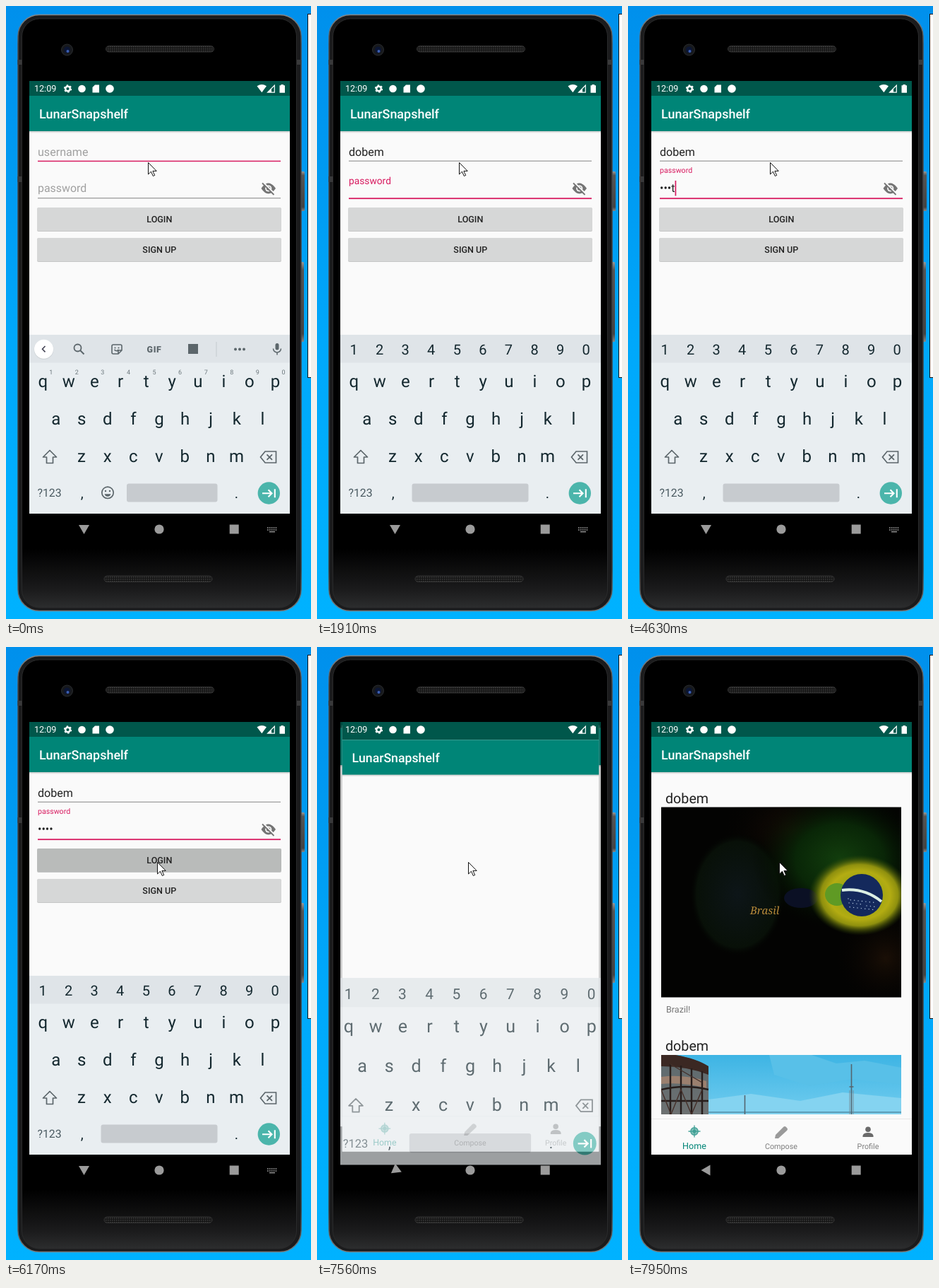
These frames come from a looping animation (432 px wide and 867 px high, 8000 ms). An HTML page:

```html
<!DOCTYPE html>
<html lang="en">
<head>
<meta charset="utf-8">
<title>Login demo</title>
<style>
html, body { margin: 0; width: 100%; height: 100%; overflow: hidden; background: #0ae; }
svg { display: block; width: 432px; height: 867px; font-family: Roboto, sans-serif; text-rendering: geometricPrecision; }
.mid { text-anchor: middle; }
.med { font-weight: 500; }
</style>
</head>
<body>
<script>
const LOOP = 8000, PINK = '#d81b60', USER = 'dobem';
const ICON = '#5c666b', KEY = '#14282f';

const rect = (x, y, w, h, fill, more = '') => `<rect x="${x}" y="${y}" width="${w}" height="${h}" fill="${fill}" ${more}/>`;
const disc = (x, y, r, fill, more = '') => `<circle cx="${x}" cy="${y}" r="${r}" fill="${fill}" ${more}/>`;
const oval = (x, y, rx, ry, fill) => `<ellipse cx="${x}" cy="${y}" rx="${rx}" ry="${ry}" fill="${fill}"/>`;
const path = (d, fill, more = '') => `<path d="${d}" fill="${fill}" ${more}/>`;
const line = (d, color, w = 1, more = '') => path(d, 'none', `stroke="${color}" stroke-width="${w}" ${more}`);
const text = (x, y, size, fill, str, cls = '', more = '') =>
  `<text x="${x}" y="${y}" font-size="${size}" fill="${fill}" class="${cls}" ${more}>${str}</text>`;
const group = (id, body, more = '') => `<g id="${id}" ${more}>${body}</g>`;
const row = (chars, x, y, size, fill) =>
  [...chars].map((c, i) => text(x + i * 36.58, y, size, fill, c, 'mid')).join('');
const ramp = (id, stops, kind = 'linear', more = 'x2="0" y2="1"') => `<${kind}Gradient id="${id}" ${more}>` +
  stops.map(([o, c, a = 1]) => `<stop offset="${o}" stop-color="${c}" stop-opacity="${a}"/>`).join('') + `</${kind}Gradient>`;
const clip = (id, x, y, w, h) => `<clipPath id="${id}">${rect(x, y, w, h, '#000')}</clipPath>`;

const defs = '<defs>' +
  ramp('sky', [[0, '#0090ec'], [.3, '#009bf2'], [.55, '#00a8fb'], [1, '#00b2ff']]) +
  ramp('metal', [[0, '#858789'], [.05, '#4a4b4d'], [.93, '#3a3b3c'], [1, '#77797b']]) +
  ramp('sheen', [[0, '#000'], [.9, '#000'], [.97, '#1b1b1c'], [1, '#2c2d2e']]) +
  ramp('side', [[0, '#999'], [.1, '#555'], [.9, '#444'], [1, '#888']]) +
  ramp('shade', [[0, '#000', .2], [1, '#000', 0]]) +
  ramp('day', [[0, '#3db4e4'], [1, '#72cdef']]) +
  ramp('green', [[0, '#123d0d'], [.5, '#092607'], [1, '#020601', 0]], 'radial', '') +
  ramp('rust', [[0, '#1a0f06'], [1, '#060302', 0]], 'radial', '') +
  ramp('dusk', [[0, '#0d1518'], [.85, '#081008'], [1, '#020201', 0]], 'radial', '') +
  ramp('gold', [[0, '#7f9a16'], [.6, '#b3ac12'], [.76, '#8f900e'], [1, '#2f4a08', 0]], 'radial', '') +
  clip('screen', 33, 106, 369, 656) + clip('button', 44, 285, 346, 33) +
  clip('frame', 47, 226.5, 340, 269) + clip('post', 47, 577, 340, 84) +
  '<pattern id="mesh" width="3" height="3" patternUnits="userSpaceOnUse"><rect width="3" height="3" fill="#161616"/><rect width="1.5" height="1.5" fill="#3d3d3d"/></pattern>' +
  '</defs>';

const grille = (x, y) => rect(x, y, 153, 8.5, 'url(#mesh)', 'rx="4.2" stroke="#343434"');
const phone =
  rect(0, 0, 432, 867, 'url(#sky)') +
  rect(427.5, 11.5, 8, 514, '#fff', 'stroke="#111"') +
  rect(417, 234, 6, 56, 'url(#side)', 'rx="1.5"') + rect(417, 362, 5, 113, 'url(#side)', 'rx="1.5"') +
  rect(17, 12.5, 401, 843, '#1b1b1c', 'rx="30" stroke="url(#metal)" stroke-width="1.5"') +
  rect(22.5, 18, 389, 833, 'url(#sheen)', 'rx="25" stroke="#2a2b2c"') +
  rect(16.5, 76, 6, 7, '#39393a') + rect(16.5, 241, 6, 8, '#39393a') + rect(412, 76, 6, 7, '#39393a') +
  grille(141.5, 56.5) + grille(139, 806) +
  disc(86.5, 62, 8, '#17191c', 'stroke="#2a2c2f"') + disc(86.5, 62, 4.5, '#0b1533') + disc(87.5, 64, 2, '#3c5fb4');

const bars = rect(33, 100, 369, 27, '#00574b') + rect(33, 127, 369, 50, '#008577') +
  rect(33, 177, 369, 3, 'url(#shade)') + text(47, 159.3, 17.96, '#fff', 'LunarSnapshelf', 'med');

const button = y => rect(44, y + .5, 346, 33.5, '#c6c7c7', 'rx="2"') + rect(44, y, 346, 33, '#d6d7d7', 'rx="2"');
const eye = path('M361.5 258Q371.5 243 382 258Q371.5 273 361.5 258Z', '#747474') + disc(371.7, 258, 4.6, '#fafafa') +
  disc(371.7, 258, 2.8, '#747474') + line('M364.5 249.5L381 266', '#fafafa', 2) + line('M363 250.5L379.5 267', '#747474', 1.8);

const login = rect(33, 106, 369, 560, '#fafafa') + bars +
  text(45, 212.3, 16.1, '#a0a0a0', 'username', '', 'id="hint"') +
  text(45, 212.3, 16.1, '#212121', '', '', 'id="user"') +
  rect(45, 214.2, 0, 1, '#212121', 'id="under"') + rect(45, 218.7, 344, 1.5, PINK, 'id="userLine"') +
  text(45, 263, 16, '#a0a0a0', 'password', '', 'id="label"') +
  text(45, 263.4, 16.1, '#212121', '', '', 'id="pass"') +
  rect(45, 271.3, 344, 1, '#808080', 'id="passLine"') + eye +
  rect(0, 0, 1.7, 21.5, PINK, 'id="caret"') +
  button(285) +
  group('ripple', disc(240, 301, 152, '#c6c8c7'), 'clip-path="url(#button)"') +
  rect(44, 285, 346, 33, '#b9bbba', 'rx="2" id="pressed"') + button(328) +
  text(217.3, 305.8, 12.57, '#222', 'LOGIN', 'mid med') + text(217.3, 349, 12.57, '#222', 'SIGN UP', 'mid med');

const dots = [325, 331, 337].map(x => disc(x, 485.5, 2, ICON)).join('');
const mic = rect(381.5, 477, 5, 9.5, ICON, 'rx="2.5"') + line('M378.5 484.5a5.5 5.5 0 0 0 11 0M384 490v3.5', ICON, 1.5);
const tools = line('M55.5 481l-4 4.2 4 4.2', '#445', 1.6) +
  disc(101.5, 483.5, 5, 'none', `stroke="${ICON}" stroke-width="1.8"`) + line('M105 487l5.5 5.5', ICON, 2) +
  line('M152 479h10q2 0 2 2v6l-5 5h-7q-2 0-2-2v-9q0-2 2-2zM164 487h-5v5M153.5 486q3 3.5 6 0', ICON, 1.6) +
  disc(154.5, 483.5, 1, ICON) + disc(159.5, 483.5, 1, ICON) +
  text(210, 489.8, 12.4, ICON, 'GIF', 'mid', 'font-weight="900" letter-spacing=".6"') +
  rect(258, 478, 14, 14, ICON) + rect(297.5, 475, 1, 21, '#c3c9cd') + dots;
const words = line('M51.5 481l4 4.2-4 4.2', '#445', 1.6) + rect(161.7, 475, 1, 21, '#c3c9cd') + rect(269.7, 475, 1, 21, '#c3c9cd') +
  [113.5, 215.5, 318].map((x, i) => text(x, 491.5, 16.4, '#6b767b', '', 'mid', `id="word${i}"`)).join('');

const board = rect(33, 465, 369, 253, '#e9eef1') + rect(33, 465, 369, 39.5, '#dfe4e8') +
  group('strip', disc(53.5, 486, 13.8, '#cdd2d5') + disc(53.5, 485.2, 13.5, '#fff') + mic +
    row('1234567890', 63.7, 521, 9, '#6d787d') +
    disc(144, 688.3, 8.2, 'none', `stroke="${ICON}" stroke-width="1.7"`) + disc(141, 686, 1.2, ICON) + disc(147, 686, 1.2, ICON) +
    path('M139.5 690.2h9q-1.2 3.6-4.5 3.6t-4.5-3.6z', ICON)) +
  group('tools', tools) + group('words', words) +
  group('digits', row('1234567890', 52, 493.2, 20, KEY)) +
  row('qwertyuiop', 52.3, 538.8, 24, KEY) + row('asdfghjkl', 70.7, 591.8, 24, KEY) + row('zxcvbnm', 107, 644.6, 24, KEY) +
  line('M62 628.5l9.5 9.5h-5v8.5h-9v-8.5h-5z', ICON, 1.7, 'stroke-linejoin="round"') +
  line('M367 630h15.5v16H367l-6.5-8zM369.5 634.3l7.5 7.5m0-7.5l-7.5 7.5', ICON, 1.7) +
  text(61.5, 694.3, 15.8, '#4a5a61', '?123', 'mid') + text(107.7, 696, 20, KEY, ',', 'mid') + text(326.5, 696, 20, KEY, '.', 'mid') +
  rect(171, 675.5, 128.5, 26, '#c7cbcf', 'rx="3" id="space"') + disc(372.3, 689, 15.7, '#4bb5ab') +
  line('M363 689.2h13.5m-5-5l5 5-5 5M380.8 683.2v12', '#fff', 2.1);

// Two posts: a glowing eye with a blue disc, and a tower under a bright sky.
const stars = Array.from({ length: 22 }, (_, i) =>
  disc(312 + (i * 17.3) % 40, 356 + (i * 7.7) % 16, .7, '#b9cfe4')).join('');
const photo1 = group('eye', rect(47, 226, 340, 270, '#030302') +
  oval(235, 260, 100, 75, 'url(#rust)') + oval(155, 350, 68, 88, 'url(#dusk)') +
  oval(300, 300, 125, 100, 'url(#green)') + oval(365, 440, 70, 70, 'url(#rust)') +
  oval(245, 355, 24, 14, '#0b1024') +
  oval(328, 351, 72, 57, 'url(#gold)') +
  oval(296, 350, 17, 16, '#5f9a24') + disc(331, 351, 30, '#14295c') + stars +
  line('M303 344Q334 340 359 360', '#dcefe4', 4) +
  text(173, 377.5, 15, '#b98b3a', 'Brasil', '', 'font-style="italic" font-family="Noto Serif, serif"'),
  'clip-path="url(#frame)"');
const photo2 = group('tower', rect(47, 577, 340, 84, 'url(#day)') +
  path('M200 577h60l35 12 40-4 52 10v24l-70-8-60 10-50-16z', '#58c0e8') +
  path('M114 640l60-8 70 10 60-12 83 8v23H114z', '#84d3f0') +
  path('M47 577h20q28 5 47 16v68H47z', '#6b4a3c', 'opacity=".7"') +
  path('M47 577h20q30 5 47 16v12q-30-12-67-12z', '#3b2823') +
  path('M47 608q32-4 64 6v10q-32-9-64-6z', '#9b806f') +
  line('M47 626q34-8 67 0M47 642h67M60 590v71M75 592v69M90 596v65M105 600v61', '#271d1b', 2.4) +
  line('M47 626l14 35 14-35 15 35 15-35M60 590l45 26', '#45302a', 1.4) +
  line('M114 658h273', '#5b9db8', 2) +
  line('M316.5 590v71M313.5 622h6M165.5 634v27', '#546570', 1.6) + line('M314 627v34M319 627v34', '#75858c', .8),
  'clip-path="url(#post)"');

const teal = '#008577';
const home = rect(33, 106, 369, 612, '#fafafa') +
  group('feed', text(53, 221, 19.7, '#212121', USER) + text(53, 571, 19.7, '#212121', USER) +
    text(54, 516.7, 12.6, '#757575', 'Brazil!') + group('photos', photo1 + photo2)) +
  rect(33, 667, 369, 1, '#e8e8e8') + rect(33, 668, 369, 50, '#fafafa') +
  disc(94, 685, 5.2, '#7fc0b8', 'stroke="#45a298" stroke-width="1.4"') + disc(94, 685, 2.2, '#2a9387') +
  line('M94 676.5v17M85.5 685h17', '#45a298', 1.3) +
  path('M208 695l1-5 11-11q2-2 4 0l1 1q2 2 0 4l-12 11z', '#9a9a9a') +
  disc(340, 682.3, 3.8, '#6a6a6a') + path('M332.5 693v-2q1-4 7.5-4t7.5 4v2z', '#6a6a6a') +
  text(94, 709.8, 12.57, teal, 'Home', 'mid') +
  text(217, 709.8, 10.78, '#7d7d7d', 'Compose', 'mid') + text(340, 709.8, 10.78, '#7d7d7d', 'Profile', 'mid') + bars;

const status = text(40, 121.4, 12.57, '#fff', '12:09') +
  disc(87.5, 117, 3.3, 'none', 'stroke="#fff" stroke-width="2.4"') +
  disc(87.5, 117, 4.8, 'none', 'stroke="#fff" stroke-width="1.7" stroke-dasharray="2.5 2.53"') +
  disc(107.5, 117, 5.3, '#fff') +
  path('M126 111.5h6v11h-9.5v-7.5z', '#fff') + disc(147, 117, 5.8, '#fff') +
  path('M355.5 113.3q7-4.8 13.5 0l-6.7 9z', '#fff') +
  line('M380.3 112.3v9.8h-9.7z', '#fff', 1.2) + path('M376 116.8v5.3h-5.3z', '#fff') +
  path('M387.5 112.2h2v-1.2h3.5v1.2h2v10.6h-7.5z', '#fff');

const nav = path('M-7 0L6-7.5V7.5z', '#9b9b9b', 'id="back"') + disc(217, 740, 6.6, '#9b9b9b') + rect(316.7, 733.5, 13, 13, '#9b9b9b') +
  group('kbIcon', line('M370 738h14M370 741h14', '#a0a0a0', 1.6, 'stroke-dasharray="1.7 1.2"') + rect(373, 743, 8, 1.3, '#a0a0a0'));

const mouse = path('M.5 .5v16.5l4-3.8 2.8 6.3 2.4-1-2.8-6.1h5.3z', '#fff', 'id="mouse" stroke="#111"');

document.body.innerHTML = `<svg viewBox="0 0 432 867">${defs}${phone}<g clip-path="url(#screen)">` +
  group('old', login) + rect(33, 106, 369, 612, '#000', 'id="dim"') + group('fresh', home) + group('board', board) +
  `</g>${status}${nav}${mouse}</svg>`;

const el = {};
document.querySelectorAll('svg [id]').forEach(n => el[n.id] = n);

// Tables of [start ms, value, ...]; the last row already reached applies.
const USERNAME = [[0, 0], [310, 1], [460, 2], [740, 3], [860, 4], [1110, 5]];
const GUESSES = ['', 'd do did', 'do done does', 'dob dobs doby', 'dobe done does', 'dobem dobe done'];
const PASSWORD = [[0, ''], [3270, '•e'], [3530, '••s'], [3670, '•••t'], [5140, '••••']];
const FLOAT = [[0, 0], [1910, .4], [2030, .88], [2180, 1]];
const CARET = [[0, 0], [310, 1], [1660, 0], [2030, 1], [2470, 0], [2990, 1], [4210, 0], [4630, 1],
  [5140, 0], [5620, 1], [6170, 0], [6600, 1]];
const MOUSE = [[0, 201, 221], [4750, 201, 224], [4870, 201, 231], [5020, 204, 246], [5140, 209, 268],
  [5260, 217, 292], [5380, 220, 310], [5500, 219, 313], [5620, 214, 304]];
// old scale, board opacity, new scale, new opacity, back arrow angle
const SWITCH = [[0, 1, 1, 1, 0, -90], [7440, 1.008, .95, .93, .5, -80], [7560, 1.045, .67, .985, 1, -37],
  [7680, 1.125, .2, .997, 1, -6], [7800, 1.137, 0, 1, 1, 0]];

const at = (table, t) => table.findLast(r => r[0] <= t).slice(1);
const set = (id, attrs) => { for (const k in attrs) el[id].setAttribute(k, attrs[k]); };
const show = (id, on) => { el[id].style.display = on ? '' : 'none'; };
const zoom = (s, cy) => `translate(217.5 ${cy}) scale(${s}) translate(-217.5 ${-cy})`;

function draw(t) {
  const [typed] = at(USERNAME, t), [pass] = at(PASSWORD, t), [f] = at(FLOAT, t);
  const secret = t >= 1910;

  el.user.textContent = USER.slice(0, typed);
  el.pass.textContent = pass;
  show('hint', !typed);
  const width = typed ? el.user.getComputedTextLength() : 0;
  set('under', { width: secret ? 0 : width });
  set('userLine', secret ? { fill: '#858585', height: 1 } : { fill: PINK, height: 1.5 });
  set('passLine', secret ? { fill: PINK, height: 1.8 } : { fill: '#808080', height: 1 });
  set('label', { y: 263 - 26.6 * f, 'font-size': 15.9 - 5.3 * f, fill: secret ? PINK : '#a0a0a0' });
  show('caret', at(CARET, t)[0]);
  set('caret', secret
    ? { x: 45 + (pass ? el.pass.getComputedTextLength() : 0), y: 247 }
    : { x: 45 + width, y: 195.3 });
  show('ripple', t >= 6020 && t < 6170);
  show('pressed', t >= 6170 && t < 6320);

  show('strip', !secret);
  show('tools', !typed);
  show('words', typed && !secret);
  show('digits', secret);
  set('space', secret ? { x: 134.5, width: 165 } : { x: 171, width: 128.5 });
  GUESSES[typed].split(' ').forEach((w, i) => { if (el['word' + i]) el['word' + i].textContent = w; });

  const [s, boardAlpha, ns, newAlpha, angle] = at(SWITCH, t);
  set('old', { transform: zoom(s, 397) });
  set('board', { transform: zoom(s, 397), opacity: boardAlpha });
  set('fresh', { transform: zoom(ns, 420), opacity: newAlpha });
  show('old', t < 7800);
  show('fresh', t >= 7440);
  set('dim', { opacity: t >= 7440 && t < 7800 ? .2 : 0 });
  set('back', { transform: `translate(110.5 740) rotate(${angle})` });
  show('kbIcon', t < 7440);
  show('feed', t >= 7800);
  show('photos', t >= 7950);
  set('mouse', { transform: `translate(${at(MOUSE, t)})` });
}

const start = performance.now();
function tick() {
  draw((performance.now() - start) % LOOP);
  requestAnimationFrame(tick);
}
tick();
</script>
</body>
</html>
```
